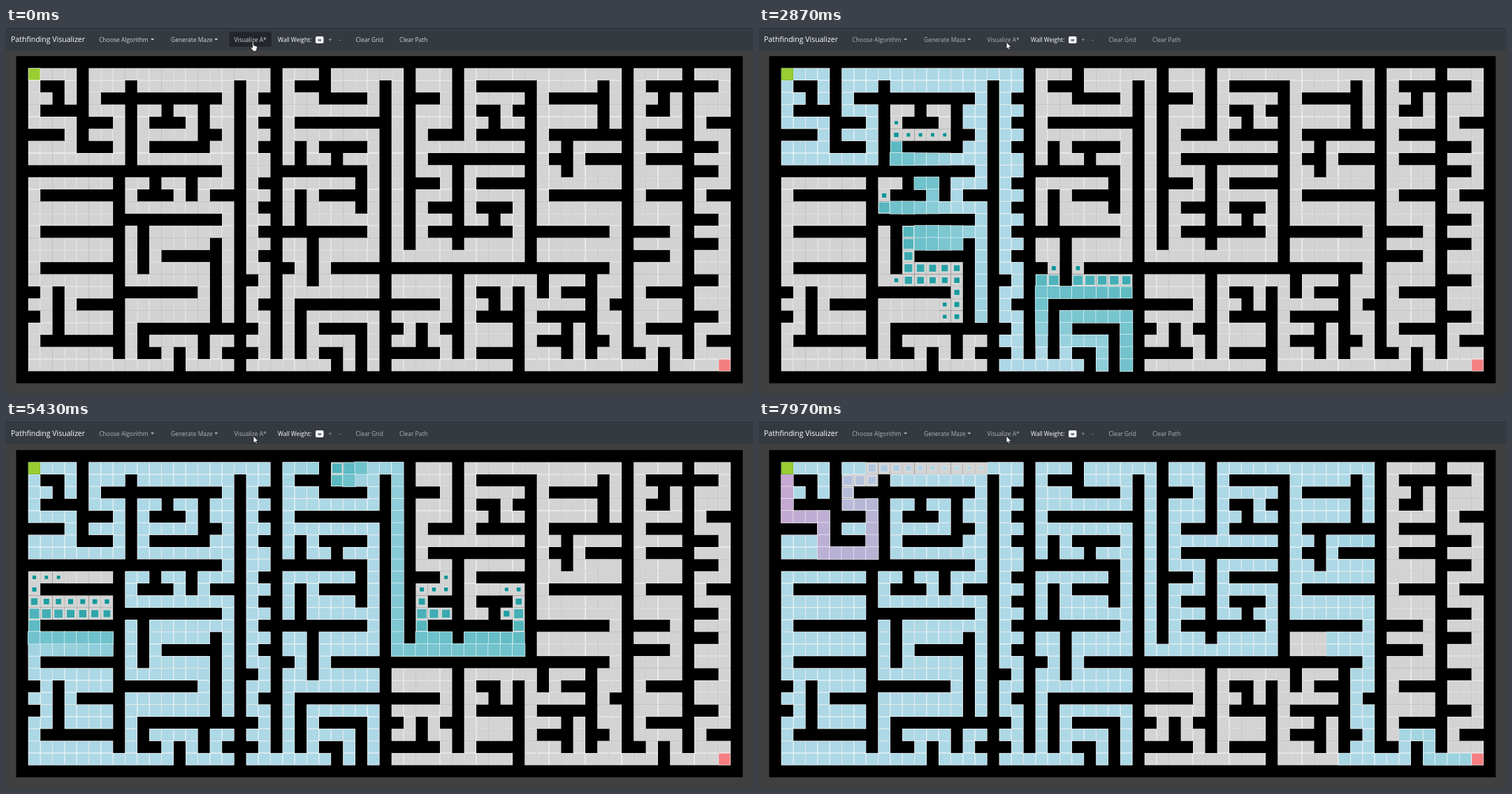
Recreate the animation shown at these times as an HTML page with a canvas. Size 1069 px wide and 524 px high, loop 8 s.

```html
<!DOCTYPE html>
<html lang="en">
<head>
<meta charset="utf-8">
<title>Pathfinding Visualizer</title>
<style>
html, body { margin: 0; width: 100%; height: 100%; overflow: hidden; background: #404040; }
canvas, svg { position: absolute; left: 0; top: 0; }
svg { font: 8.45px "Open Sans", "Noto Sans", sans-serif; }
.link { fill: #d3d5d7; }
.busy .link { fill: #b1b4b7; }
.busy .idle, .working { display: none; }
.busy .working { display: inline; }
</style>
</head>
<body>
<canvas width="1069" height="524"></canvas>
<svg id="nav" width="1069" height="524">
  <rect width="1069" height="32" fill="#343a40"/>
  <rect width="1069" height="1" fill="#26323c"/>
  <text x="7" y="20.4" font-size="10.56" fill="#fff">Pathfinding Visualizer</text>
  <rect class="idle" x="319.5" y="5.5" width="60.5" height="21.5" rx="2.5" fill="#23272b"/>
  <g class="link">
    <text x="133.3" y="19.6">Choose Algorithm</text>
    <path d="M207 15h5.2l-2.6 2.7z"/>
    <text x="236" y="19.6">Generate Maze</text>
    <path d="M298.2 15h5.2l-2.6 2.7z"/>
    <text x="326.5" y="19.6">Visualize A*</text>
    <text x="461.5" y="19.6">+</text>
    <text x="476.3" y="19.6">-</text>
    <text x="500.5" y="19.6">Clear Grid</text>
    <text x="563" y="19.6">Clear Path</text>
  </g>
  <text x="389" y="19.6" fill="#fff">Wall Weight:</text>
  <rect x="443" y="12" width="11.5" height="10" rx="2" fill="#f8f9fa"/>
  <text x="448.8" y="19.6" font-size="7.5" font-weight="700" text-anchor="middle" fill="#212529">∞</text>
  <path class="idle" fill="#fff" stroke="#000" stroke-width=".8" stroke-linejoin="round"
    d="M352.6 21q1-1.3 2 0v4l4.2 1q.9.4.7 1.6l-.7 3.4-.6 2.2h-4.8l-.8-1.6-2.6-3.4q-.3-1.3 1-1.1l1.6 1.3z"/>
  <path class="working" fill="#fff" stroke="#000" stroke-width=".7" d="M354 20v10.2l2.3-2.1 1.5 3.3 1.6-.7-1.5-3.2h3.1z"/>
</svg>
<script>
const MAZE = `
....#...............#...#......#...#.............#....#...
.##.#...#........#..#.###....#.#...#.#####.....#.#.######.
..#.#.##########.#.##...####.#.###.#.....#.#####.#..#.#...
.####...#..#..#..#..#........#.#...#.##.##.....#.#.##.#...
....###.#.###.#..#.##.########.#...#..#..#.....#.#....#.##
###.#...#.....##.#..#........#.#.###.#####.#######.####...
....###.#.#####..#.##.#.####.#.#.........#..#....#....###.
........#........#..#.#..#...#.#.#########.##.####.####...
################.#..########.#.#...#.....#..#....#....###.
.......#..#..#...#.##......#.#.###.#.#####.......#....#...
.#######.###.#.###..#.#.####.#.#...#.....#.#######.####.##
.......#.........#.##.#....#.#.#.###.###.#.......#....#...
.......#########.#..#.#......#.#...#..#..#.......#....###.
.#######.#.......#.#########.#.#.#######.#######.####.#...
.......#.#.....#.#..#..#.....#.#...#.....#.......#....###.
.......#.#.#####.#.##..#.....#...........#.......####.#...
.#######.#.....#.#..##.#.#######################.#....#...
.......#.......#.##.#..#.....#.....#......#...#..#....###.
#.#....#######.#.#..#........#.....#.##.#.#.###..#.####...
..#.####.......#.#.##.############.#..#.#.....#.##....#...
#.#....#.......#.#..#.#......#.....#.####.#####..#....###.
..#....#.##########.#.#.####.##.#.##....#...#.#..#.####...
.#######.#....#..#..#.#....#.#..#..#....#.###.##.#....#.##
.......#.##.#.#.###.#.#.##.#.#####.#.####...#.#..##.#.#...
............#....#.......#.#.#..........#...........#.....`.trim().split("\n");

const LOOP = 8000, BUSY = 570;
const VISIT = { from: 605, step: 10.25, colors: [[0, 143, 145], [112, 194, 204], [173, 216, 230]] };
const PATH = { from: 7115, step: 25, colors: [[173, 216, 230], [184, 178, 213], [210, 160, 207]] };
const GROW = 500, SETTLE = 600, PEAK = 1.1;
const LEFT = 14.5, TOP = 40.2, W = 17.33, H = 17.35;
const ctx = document.querySelector("canvas").getContext("2d");
const nav = document.getElementById("nav");

const cells = [];
MAZE.forEach((row, y) => [...row].forEach((ch, x) => {
  if (ch === ".") cells.push({ x, y, g: Infinity });
}));
const at = (x, y) => cells.find(c => c.x === x && c.y === y);
const start = at(0, 0), goal = at(57, 24);

// A* with Manhattan distance; equal scores are taken in order of discovery
function search() {
  const open = [start];
  const score = c => c.g + goal.x - c.x + goal.y - c.y;
  let count = 0;
  start.g = 0;
  while (open.length) {
    const best = open.reduce((a, b) => score(b) < score(a) ? b : a);
    open.splice(open.indexOf(best), 1);
    if (best === goal) break;
    best.visit = VISIT.from + VISIT.step * count++;
    for (const [dx, dy] of [[0, -1], [1, 0], [0, 1], [-1, 0]]) {
      const next = at(best.x + dx, best.y + dy);
      if (!next || next.g <= best.g + 1) continue;
      if (next.g === Infinity) open.push(next);
      next.g = best.g + 1;
      next.prev = best;
    }
  }
  for (let c = goal.prev; c && c !== start; c = c.prev) c.path = PATH.from + PATH.step * c.g;
}
search();

const rgb = c => `rgb(${c.map(Math.round)})`;
const mix = (a, b, k) => a + (b - a) * k;
const ease = k => { k = Math.min(1, k); return k * k * (3 - 2 * k); };

function square(c, color, scale = 1, edge = "#fff") {
  const w = W * scale, h = H * scale, b = 0.5 * scale;
  const x = LEFT + W * (c.x + 1.5) - w / 2, y = TOP + H * (c.y + 1.5) - h / 2;
  ctx.fillStyle = edge;
  ctx.fillRect(x, y, w, h);
  ctx.fillStyle = color;
  ctx.fillRect(x + b, y + b, w - 2 * b, h - 2 * b);
}

function pop(c, age, [a, b, d]) {
  const rising = age < GROW;
  const k = ease(rising ? age / GROW : (age - GROW) / SETTLE);
  const color = rising ? a.map((v, i) => mix(v, b[i], k)) : b.map((v, i) => mix(v, d[i], k));
  square(c, rgb(color), rising ? mix(0.3, PEAK, k) : mix(PEAK, 1, k));
}

function draw(t) {
  nav.classList.toggle("busy", t >= BUSY);
  ctx.fillStyle = "#404040";
  ctx.fillRect(0, 0, 1069, 524);
  ctx.fillStyle = "#000";
  ctx.fillRect(LEFT, TOP, W * 60, H * 27);

  const moving = [];
  for (const c of cells) {
    const lit = c.visit <= t;
    square(c, "#d3d3d3", 1, lit ? "#d3d3d3" : "#fff");
    if (lit) moving.push(c);
  }
  for (const c of moving) {
    if (c.path <= t) pop(c, t - c.path, PATH.colors);
    else pop(c, t - c.visit, VISIT.colors);
  }
  square(start, "#9acd32", 1, t >= BUSY ? "#4f9f20" : "#fff");
  square(goal, "#f57f80");
}

const begin = performance.now();
function frame() {
  draw((performance.now() - begin) % LOOP);
  requestAnimationFrame(frame);
}
frame();
</script>
</body>
</html>
```
